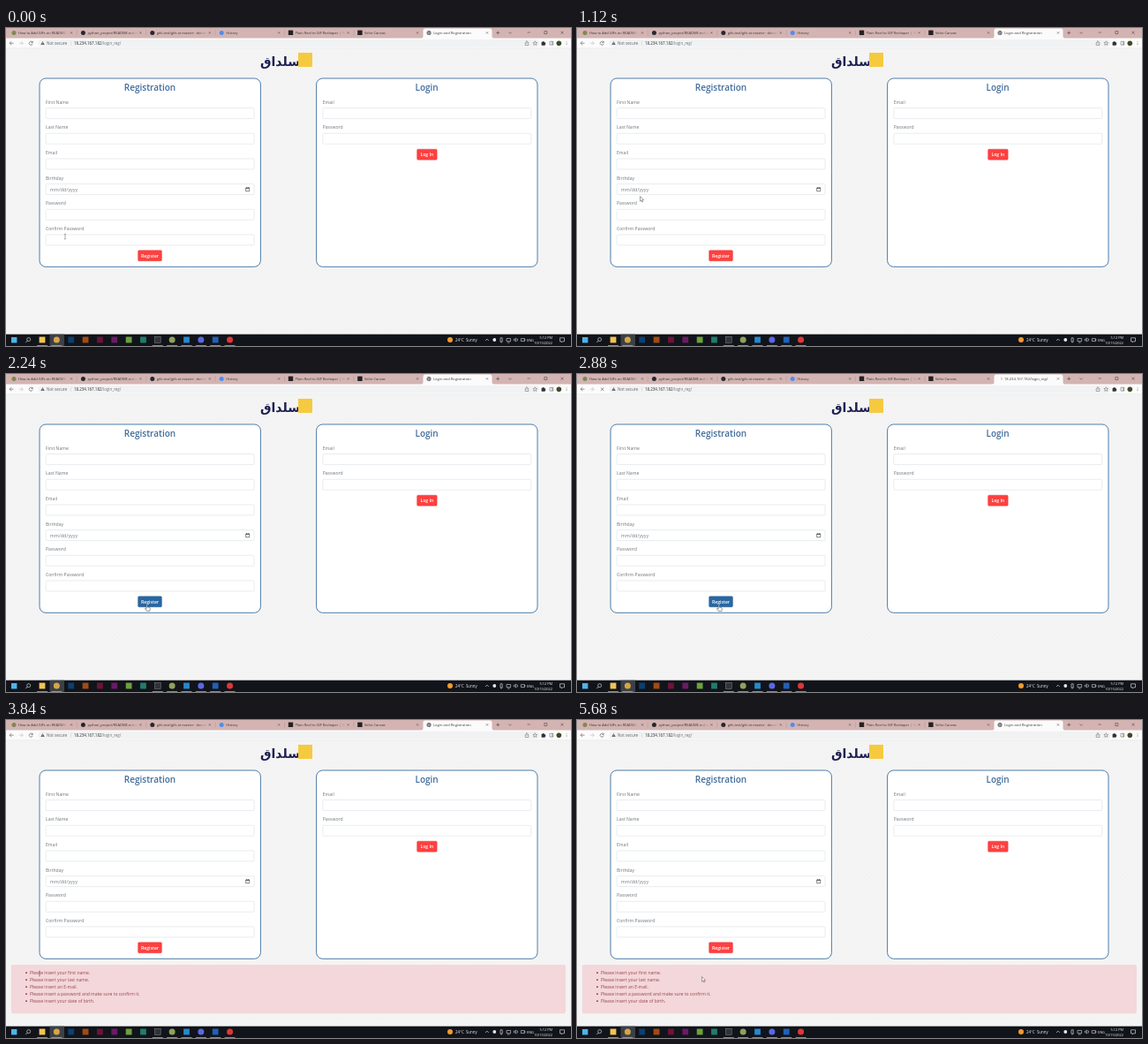
Animation, 640 px wide and 360 px high, one loop 5760 ms. Source, as an HTML page:

```html
<!DOCTYPE html>
<html lang="en">
<head>
<meta charset="utf-8">
<title>Login and Registration</title>
<style>
html, body { margin: 0; width: 100%; height: 100%; overflow: hidden; background: #f4f4f4; }
svg.stage { display: block; width: 100vw; height: 100vh; }
text { font-family: "Open Sans", "Noto Sans", sans-serif; white-space: pre; }
</style>
</head>
<body>
<svg class="stage" id="stage" viewBox="0 0 640 360" xmlns="http://www.w3.org/2000/svg"></svg>
<script>
const LOOP = 5760, STEP = 80;
const LOAD_AT = 2640, ERROR_AT = 3120;
const ADDRESS = '18.234.167.182/login_reg/';
const STRIP = '#d3b4b3', RED = '#fe4040', BLUE = '#2867a2';
const ROW = 28.67, TOP = 90.6;

const rect = (x, y, w, h, fill, more = '') =>
  `<rect x="${x}" y="${y}" width="${w}" height="${h}" fill="${fill}" ${more}/>`;
const dot = (x, y, r, fill) => `<circle cx="${x}" cy="${y}" r="${r}" fill="${fill}"/>`;
const line = (d, stroke, w = 0.6, more = '') =>
  `<path d="${d}" fill="none" stroke="${stroke}" stroke-width="${w}" ${more}/>`;
const text = (x, y, size, fill, str, more = '') =>
  `<text x="${x}" y="${y}" font-size="${size}" fill="${fill}" ${more}>${str}</text>`;
const cross = (x, y, r, color, w) =>
  line(`M${x - r} ${y - r}l${2 * r} ${2 * r}M${x + r} ${y - r}l${-2 * r} ${2 * r}`, color, w);

function tabs() {
  const list = [
    ['How to Add GIFs on README – Guide', '#7d8a50'],
    ['python_project/README.md at main', '#24292f'],
    ['gifs-test/gifs at master · dorvel m', '#24292f'],
    ['History', '#4f8df0'],
    ['Plain Reel to GIF Reshaper | Velto', '#222222'],
    ['Velto Canvas', '#222222']
  ];
  let out = rect(0, 0, 640, 12, STRIP);
  list.forEach(([title, color], i) => {
    const x = 78.4 * i;
    out += i > 3 ? rect(x + 6.2, 2.6, 5.4, 5.4, color) : dot(x + 9, 5.4, 2.5, color);
    out += `<svg x="${x + 14}" y="0" width="57" height="11">${text(0, 6.9, 4, '#3c3434', title)}</svg>`;
    out += rect(x + 60, 1, 11.2, 10, 'url(#fade)');
    out += cross(x + 74, 5.4, 1.1, '#4b4040', 0.5);
    if (i < 5) out += line(`M${x + 80.3} 2.5v6`, '#a58d8c', 0.4);
  });
  out += '<path d="M469.5 12q3 0 3-3V3q0-2.5 2.5-2.5h73q2.5 0 2.5 2.5v6q0 3 3 3z" fill="#fcfbfb"/>';
  out += `<g id="globe">${dot(479, 5.4, 2.5, '#5f6368')}${line('M476.7 4.8h3l1 1.4M478 7.6v-1.4h2', '#eee', 0.5)}</g>`;
  out += line('M479 3.2a2.2 2.2 0 0 1 2.2 2.2', '#8a8d91', 0.6, 'id="spin"');
  out += text(484, 6.9, 4.1, '#3c4043', '', 'id="title"');
  out += cross(545, 5.4, 1.1, '#444', 0.5);
  out += line('M555.2 5.4h4M557.2 3.4v4', '#4b4040', 0.6);
  out += line('M569.4 4.6l1.7 1.7 1.7-1.7M590.5 5h3.4M609.8 3.6h3v3h-3z', '#333', 0.5);
  return out + cross(630, 5.2, 1.5, '#333', 0.5);
}

function toolbar() {
  const ink = '#4d5054';
  let out = rect(0, 11.5, 640, 11.5, '#fcfbfb') + rect(36.5, 13, 568, 8.4, '#f1f2f3', 'rx="4.2"');
  out += line('M8.6 17.2H4.2M6.2 15.1l-2.1 2.1 2.1 2.1', ink);
  out += line('M14.8 17.2h4.4M17.2 15.1l2.1 2.1-2.1 2.1', '#b9b9bb');
  out += `<g id="reload">${line('M30 16.2a2 2 0 1 0 .2 1.6M30.2 14.8v1.8h-1.8', ink)}</g>`;
  out += `<g id="stop">${cross(28.6, 17.2, 1.7, ink, 0.65)}</g>`;
  out += '<path d="M41.5 14.9l2.2 4h-4.4z" fill="#5f6368"/>' + line('M41.5 16.2v1.2M41.5 17.9v.5', '#fff', 0.4);
  out += text(46, 18.8, 4.6, '#5f6368', 'Not secure') + line('M73.5 14.8v5', '#c4c6c8', 0.4);
  out += text(77, 18.8, 4.45, '#27282a', '18.234.167.182<tspan fill="#70757a">/login_reg/</tspan>');
  out += line('M589 16.5h-.8v3h3.6v-3h-.8M590 18v-3.3M588.9 15.7l1.1-1.1 1.1 1.1', ink, 0.45);
  out += line('M599.3 14.8l.7 1.6 1.7.2-1.3 1.1.4 1.7-1.5-.9-1.5.9.4-1.7-1.3-1.1 1.7-.2z', ink, 0.45);
  out += '<path d="M606.6 15.8h1.2a.8.8 0 0 1 1.6 0h1.2v1.3a.8.8 0 0 1 0 1.6v1h-4z" fill="#303235"/>';
  out += line('M616 15.3h3.8v3.8H616zM618.7 15.3v3.8', ink, 0.5) + dot(626.3, 17.2, 2.8, '#3e4a29');
  [15.6, 17.2, 18.8].forEach(y => out += dot(635, y, 0.45, ink));
  return out + line('M0 22.8H640', '#dedede', 0.4);
}

function field(x, i, label, hint = '') {
  const y = TOP + ROW * i;
  return text(x, y - 5, 5.1, '#70757a', label) +
    rect(x + 0.1, y, 236, 12, '#fff', 'rx="1.3" stroke="#d3d8de" stroke-width=".5"') +
    (hint && text(x + 4.8, y + 8, 5.4, '#777c81', hint));
}

const card = (x, title) =>
  rect(x, 57, 250.4, 213.3, '#fff', 'rx="7" stroke="#4d7cab" stroke-width="1"') +
  text(x + 125, 71.2, 10, '#416b9b', title, 'text-anchor="middle" font-weight="600"');

const button = (x, y, w, label, id) =>
  rect(x, y, w, 12, RED, `rx="1.2" id="${id}" stroke="#e03434" stroke-width=".4"`) +
  text(x + w / 2, y + 7.9, 5.1, '#fff', label, 'text-anchor="middle" font-weight="600"');

function page() {
  let out = rect(0, 23, 640, 324, '#f4f4f4') + rect(0, 23, 640, 324, 'url(#paper)');
  out += `<text x="310.5" y="42.5" font-size="14" font-weight="700" fill="#1d1f52" text-anchor="middle" style="font-family:'DejaVu Sans',sans-serif">سلداق</text>`;
  out += rect(331, 28, 16, 16, '#f5ca3f');
  out += card(38, 'Registration') + card(351.6, 'Login');
  ['First Name', 'Last Name', 'Email', 'Birthday', 'Password', 'Confirm Password'].forEach((s, i) =>
    out += field(45, i, s, s === 'Birthday' ? 'mm/dd/yyyy' : ''));
  out += line('M271.7 181h4v3.8h-4zM271.7 181.5h4M272.6 180v1M274.8 180v1', '#333', 0.6);
  out += field(358.7, 0, 'Email') + field(358.7, 1, 'Password');
  out += button(149.6, 251.7, 26.8, 'Register', 'register') + button(465.6, 137.2, 22.6, 'Log In', 'login');
  let list = rect(6.4, 277.6, 627, 54.2, '#f4d7da', 'stroke="#efc3c8" stroke-width=".4" rx="1.2"');
  ['first name.', 'last name.', 'an E-mail.', 'a password and make sure to confirm it.', 'date of birth.'].forEach((s, i) => {
    const y = 287.9 + 8 * i, your = s[0] === 'a' ? '' : 'your ';
    list += dot(23, y - 1.7, 0.9, '#8b2f39') + text(27, y, 5, '#93444d', `Please insert ${your}${s}`);
  });
  return out + `<g id="alert">${list}</g>`;
}

function taskbar() {
  let out = rect(0, 346.7, 640, 13.3, '#11141a') + rect(49.5, 346.7, 16.5, 13.3, '#3b4048');
  out += rect(6, 350, 6.4, 6.4, '#4cb4ea');
  out += `<circle cx="25.7" cy="352.6" r="2" fill="none" stroke="#eee" stroke-width=".6"/>` + line('M24.3 354.1l-2 2', '#eee', 0.7);
  const icons = ['#f2c454', 'o#d9a441', '#0b3f70', '#a24a12', '#6d1239', '#6b1a64', '#6ea03a', '#1f7d6c',
    '#30343a', 'o#8fa25a', '#2489d0', 'o#5a67e6', '#2160b8', 'o#e03537'];
  icons.forEach((c, i) => {
    const x = 41 + 16.35 * i;
    out += c[0] === 'o' ? dot(x, 353, 3.5, c.slice(1))
      : rect(x - 3.4, 349.6, 6.8, 6.8, c, i === 8 ? 'stroke="#888" stroke-width=".5"' : '');
    if (i < 2 || i > 7) out += rect(x - 6, 359.2, 12, 0.8, '#78b4e2');
  });
  out += dot(503, 353, 3, '#f29a2e') + text(509, 354.8, 4.4, '#f2f2f2', '24°C  Sunny');
  out += line('M543 354l1.9-1.9 1.9 1.9', '#eee', 0.6);
  out += dot(553.3, 353, 1.9, '#e8e8e8') + line('M560 350.8h2.2v4.4H560zM561 355.2v1.2', '#eee', 0.6);
  out += line('M567 351.5h4.6v3.2H567zM568 356h2.6', '#eee', 0.55);
  out += line('M575.3 352.2h1l1.3-1.2v4l-1.3-1.2h-1zM579 351.4q1.4 1.6 0 3.2', '#eee', 0.55);
  out += line('M583.3 351.6h4v3h-4zM587.3 352.4h.6v1.4h-.6', '#eee', 0.55);
  out += text(590, 354.5, 3.9, '#f2f2f2', 'ENG');
  out += text(619, 352, 3.9, '#f2f2f2', '5:12 PM', 'text-anchor="end"');
  out += text(619, 358.2, 3.9, '#f2f2f2', '10/15/2022', 'text-anchor="end"');
  return out + line('M627.5 350.8h5v4h-2l-1.2 1.2v-1.2h-1.8z', '#eee', 0.6);
}

const cursors =
  `<g id="arrow"><path d="M0 0v5.6l1.3-1.2.9 2 .9-.4-.9-1.9h1.8z" fill="#fff" stroke="#333" stroke-width=".45"/></g>
   <g id="beam">${line('M-1-2.8h.7L0-2.5l.3-.3H1M0-2.5v5M-1 2.8h.7L0 2.5l.3.3H1', '#4a4a4a', 0.5)}</g>
   <g id="hand"><path d="M-.6.4q.6-.8 1.2 0v2.7l2.4.6q.6.2.5 1l-.5 2.8H-.4L-2.2 5q-.2-.9.6-.8l1 .7z" fill="#fff" stroke="#222" stroke-width=".45"/></g>`;

document.getElementById('stage').innerHTML =
  `<defs>
    <linearGradient id="fade"><stop offset="0" stop-color="${STRIP}" stop-opacity="0"/><stop offset="1" stop-color="${STRIP}"/></linearGradient>
    <pattern id="paper" width="5" height="5" patternUnits="userSpaceOnUse"><path d="M0 2l2 2M3 0l1 1" stroke="#efefef" stroke-width=".5"/></pattern>
  </defs>` + page() + tabs() + toolbar() + taskbar() + `<g id="pointer">${cursors}</g>`;

const el = id => document.getElementById(id);
const show = (id, on) => el(id).setAttribute('visibility', on ? 'visible' : 'hidden');

// time, x, y of the pointer's hot spot
const path = [
  [0, 67, 236], [240, 67, 236], [1120, 71.5, 190.6], [1280, 71.5, 190.6], [2080, 159.7, 260.8],
  [2240, 159.8, 260.8], [2880, 160.8, 261], [3200, 160.8, 261], [3760, 38, 287],
  [3920, 38, 287], [4640, 131.5, 314], [4880, 131.5, 314], [5600, 141.5, 290.6], [LOOP, 141.5, 290.6]
];
const lineEnds = [94, 94, 81, 152, 101];

function pointerAt(t) {
  const i = path.findIndex(p => p[0] > t), a = path[i - 1], b = path[i];
  const u = (t - a[0]) / (b[0] - a[0]), e = u * u * (3 - 2 * u);
  return [a[1] + (b[1] - a[1]) * e, a[2] + (b[2] - a[2]) * e];
}

const overRegister = (x, y) => x > 149.6 && x < 176.4 && y > 251.7 && y < 263.7;

function pointerKind(x, y, error) {
  if (overRegister(x, y)) return 'hand';
  if (error && y > 282.5 && y < 322.5)
    return x > 26 && x < lineEnds[Math.floor((y - 282.5) / 8)] ? 'beam' : 'arrow';
  if (y < TOP || y > 246 || x < 45 || x > 281) return 'arrow';
  const inRow = (y - TOP) % ROW;
  return inRow < 12 || (inRow > 18.7 && inRow < 25 && x < 70) ? 'beam' : 'arrow';
}

function draw(t) {
  const [x, y] = pointerAt(t);
  const loading = t >= LOAD_AT && t < ERROR_AT, error = t >= ERROR_AT;
  const kind = pointerKind(x, y, error);
  ['arrow', 'beam', 'hand'].forEach(k => show(k, k === kind));
  el('pointer').setAttribute('transform', `translate(${x} ${y})`);
  const hover = overRegister(x, y);
  el('register').setAttribute('fill', hover ? BLUE : RED);
  el('register').setAttribute('stroke', hover ? '#1d4f80' : '#e03434');
  show('alert', error);
  show('globe', !loading);
  show('reload', !loading);
  show('stop', loading);
  show('spin', loading);
  el('spin').setAttribute('transform', `rotate(${-t * 0.36} 479 5.4)`);
  el('title').textContent = loading ? ADDRESS : 'Login and Registration';
}

function tick() {
  draw(Math.floor(performance.now() % LOOP / STEP) * STEP);
  requestAnimationFrame(tick);
}
tick();
</script>
</body>
</html>
```
